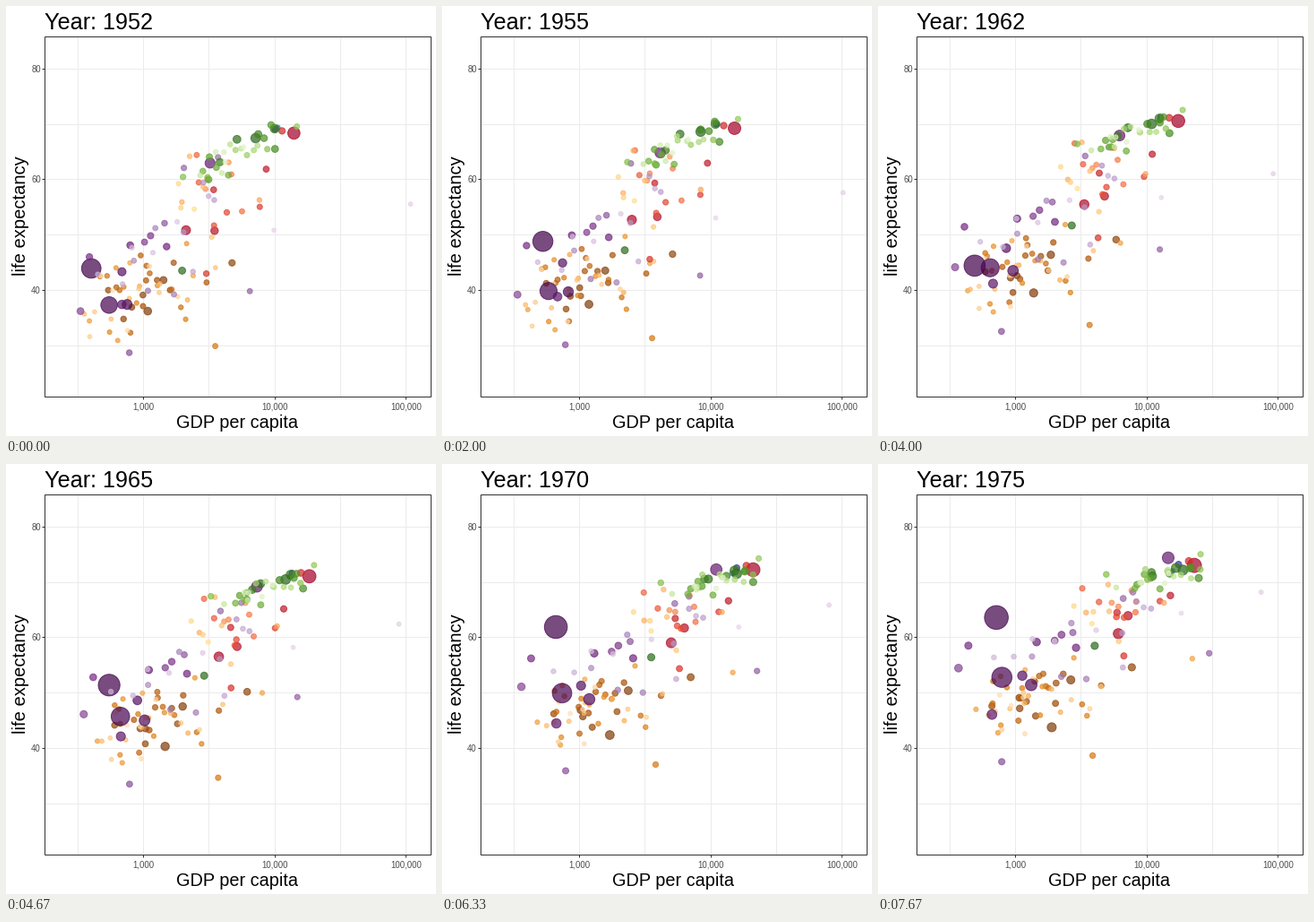
Animation, 480 px wide and 480 px high, one loop 8000 ms. Source, as a matplotlib script:

```python
import numpy as np
import matplotlib.pyplot as plt
from matplotlib.animation import FuncAnimation
from matplotlib.colors import LinearSegmentedColormap
from matplotlib.patches import Rectangle

SIZE, DPI = 480, 100
PT = 72 / DPI                       # points per pixel
LEFT, RIGHT, TOP, BOTTOM = 43, 474, 34, 436
LOOP, TICK, POSES = 8000, 40, 24
KEYS = [3, 7, 12, 16, 20, 25]       # poses that fall on a five-year survey
T = np.linspace(0, 1, len(KEYS))[:, None]

plt.rcParams["font.family"] = "Liberation Sans"
rng = np.random.default_rng(11)


def spread(n, sd):
    return sd * np.clip(rng.normal(size=n), -1.8, 1.8)


def region(n, colors, income, life, rise, pop, growth, leads):
    """Survey tracks of n dots, ranked by population: x, life, diameter, colour.

    income: low, usual and high log income; life: level at the usual income,
    slope, noise; rise: income gain, its convergence, share of the gap to
    74 years that closes, easing power; pop: top, decay over ranks.
    leads: rank -> (income, life) at both ends and population.
    """
    rank = np.arange(n)
    low, usual, high = income
    level, slope, noise = life
    gain, converge, closing, power = rise
    x0 = rng.triangular(low, usual, high, n)
    y0 = level + slope * (x0 - usual) + spread(n, noise)
    x1 = x0 + gain - converge * (x0 - usual) + spread(n, 0.09)
    y1 = y0 + closing * (74 - y0) * rng.uniform(0.8, 1.2, n)
    people = pop[0] * np.exp(-rank / pop[1])
    for i, (g0, l0, g1, l1, p) in leads.items():
        x0[i], y0[i], x1[i], y1[i] = np.log10(g0), l0, np.log10(g1), l1
        people[i] = p
    x = x0 + (x1 - x0) * T
    y = y0 + (y1 - y0) * T ** power
    diam = 4.4 + 0.735 * np.sqrt(people * growth ** T)
    ramp = LinearSegmentedColormap.from_list("ramp", colors)
    return x, y, diam, ramp(np.linspace(0, 1, n), alpha=0.7)


oceania = region(
    2, ["#313695", "#4575B4"], (3.9, 4.0, 4.1), (69, 0, 0.5),
    (0.22, 0, 0.7, 0.8), (9, 0.7), 1.6,
    {0: (10040, 69.1, 18334, 73.5, 8.7), 1: (10557, 69.4, 16234, 72.2, 2)})
africa = region(
    52, ["#7F3B08", "#B35806", "#E08214", "#FDB863", "#FEE0B6"],
    (2.45, 2.95, 3.6), (39, 6, 4), (0.17, 0, 0.3, 1), (12, 11), 1.9,
    {0: (1077, 36.3, 1982, 44.5, 33), 1: (1419, 41.9, 2785, 53.3, 22),
     4: (4725, 45.0, 8029, 55.5, 14), 22: (3521, 30.0, 3900, 39.5, 4),
     33: (2388, 42.7, 27000, 57.4, 1)})
americas = region(
    25, ["#A50026", "#D73027", "#F46D43", "#FDAE61", "#FEE090"],
    (3.15, 3.45, 4.0), (53, 14, 7), (0.27, 0.1, 0.53, 0.9), (16, 8), 1.6,
    {0: (13990, 68.4, 24073, 73.4, 158), 1: (2109, 50.9, 6660, 61.5, 57),
     2: (3478, 50.8, 7674, 65.0, 30), 5: (11367, 68.8, 22091, 74.2, 15),
     7: (7690, 55.1, 13144, 67.5, 5)})
asia = region(
    33, ["#40004B", "#762A83", "#9970AB", "#C2A5CF", "#E7D4E8"],
    (2.55, 3.1, 3.75), (48, 16, 6), (0.33, -0.4, 0.46, 1), (40, 8), 1.7,
    {1: (547, 37.4, 813, 54.2, 372), 2: (750, 37.5, 1383, 52.7, 82),
     3: (685, 43.4, 1176, 54.0, 41), 4: (684, 37.5, 660, 46.9, 47),
     5: (3217, 63.0, 16610, 75.4, 86), 11: (331, 36.3, 371, 56.1, 20),
     12: (779, 28.8, 786, 38.4, 8), 14: (6460, 39.9, 34168, 58.7, 4),
     31: (108382, 55.6, 72000, 69.3, 0.2), 32: (9867, 50.9, 19340, 65.6, 0.1),
     0: (400, 44.0, 741, 64.0, 556)})
europe = region(
    30, ["#276419", "#4D9221", "#7FBC41", "#B8E186", "#E6F5D0"],
    (3.2, 3.85, 4.05), (66.5, 12, 1.8), (0.4, 0.25, 0.72, 0.73), (45, 8), 1.2,
    {0: (7144, 67.5, 20513, 72.5, 69), 1: (1969, 43.6, 4269, 59.5, 22),
     3: (9980, 69.2, 17429, 72.8, 50), 17: (14734, 69.6, 26982, 75.4, 5)})

# The largest dot climbs, falls back and climbs again.
asia[0][:, 0] = np.log10([400, 576, 488, 613, 677, 741])
asia[1][:, 0] = [44.0, 50.5, 44.5, 58.4, 63.1, 64.0]

parts = [oceania, africa, americas, asia, europe]
log_gdp, life, diam = (np.hstack([p[k] for p in parts]) for k in range(3))
rgba = np.vstack([p[3] for p in parts])


def px(lg):
    return 153.5 + 146.5 * (lg - 3)


def py(years):
    return 70.1 + (80 - years) * 6.19


def blend(track, pose):
    """Straight blend between the two surveys around a pose."""
    pose = max(pose, KEYS[0])
    k = np.searchsorted(KEYS, pose, side="right") - 1
    f = (pose - KEYS[k]) / (KEYS[k + 1] - KEYS[k])
    return track[k] * (1 - f) + track[k + 1] * f


fig = plt.figure(figsize=(SIZE / DPI, SIZE / DPI), dpi=DPI, facecolor="white")
ax = fig.add_axes([0, 0, 1, 1])
ax.set_xlim(0, SIZE)
ax.set_ylim(SIZE, 0)
ax.axis("off")


def line(x, y, color):
    ax.plot(np.floor(x), np.floor(y), color=color, lw=PT,
            solid_capstyle="butt", zorder=1)


def text(x, y, s, size, color="black", **kw):
    return ax.text(x, y, s, fontsize=size * PT, color=color, va="baseline", **kw)


for lg in np.arange(2.5, 5.1, 0.5):
    line([px(lg)] * 2, [TOP, BOTTOM], "#EBEBEB")
for years in range(30, 81, 10):
    line([LEFT, RIGHT], [py(years)] * 2, "#EBEBEB")
for lg in (3, 4, 5):
    line([px(lg)] * 2, [BOTTOM, BOTTOM + 3], "#333333")
    text(px(lg), 450, f"{10 ** lg:,}", 9.6, "#4D4D4D", ha="center")
for years in (40, 60, 80):
    line([LEFT - 3, LEFT], [py(years)] * 2, "#333333")
    text(38.8, py(years) + 3.4, str(years), 9.6, "#4D4D4D", ha="right")

ax.add_patch(Rectangle((LEFT, TOP), RIGHT - LEFT, BOTTOM - TOP, fill=False,
                       ec="#333333", lw=PT, zorder=4))
text(258, 471, "GDP per capita", 19.9, ha="center")
text(22, 234.5, "life expectancy", 20.2, ha="center", rotation=90,
     rotation_mode="anchor")
title = text(42.8, 25.5, "", 25.3)
dots = ax.scatter(px(log_gdp[0]), py(life[0]), s=(diam[0] * PT) ** 2,
                  facecolors=rgba, edgecolors=rgba, linewidths=PT, zorder=3)


def draw(i):
    pose = int(((i + 1) * TICK - 1) * POSES / LOOP)
    dots.set_offsets(np.column_stack([px(blend(log_gdp, pose)),
                                      py(blend(life, pose))]))
    dots.set_sizes((blend(diam, pose) * PT) ** 2)
    title.set_text(f"Year: {round(1952 + 55 * max(pose - 3, 0) / 48)}")
    return dots, title


anim = FuncAnimation(fig, draw, frames=LOOP // TICK, interval=TICK, repeat=True,
                     repeat_delay=0, init_func=lambda: draw(0))
plt.show()
```
